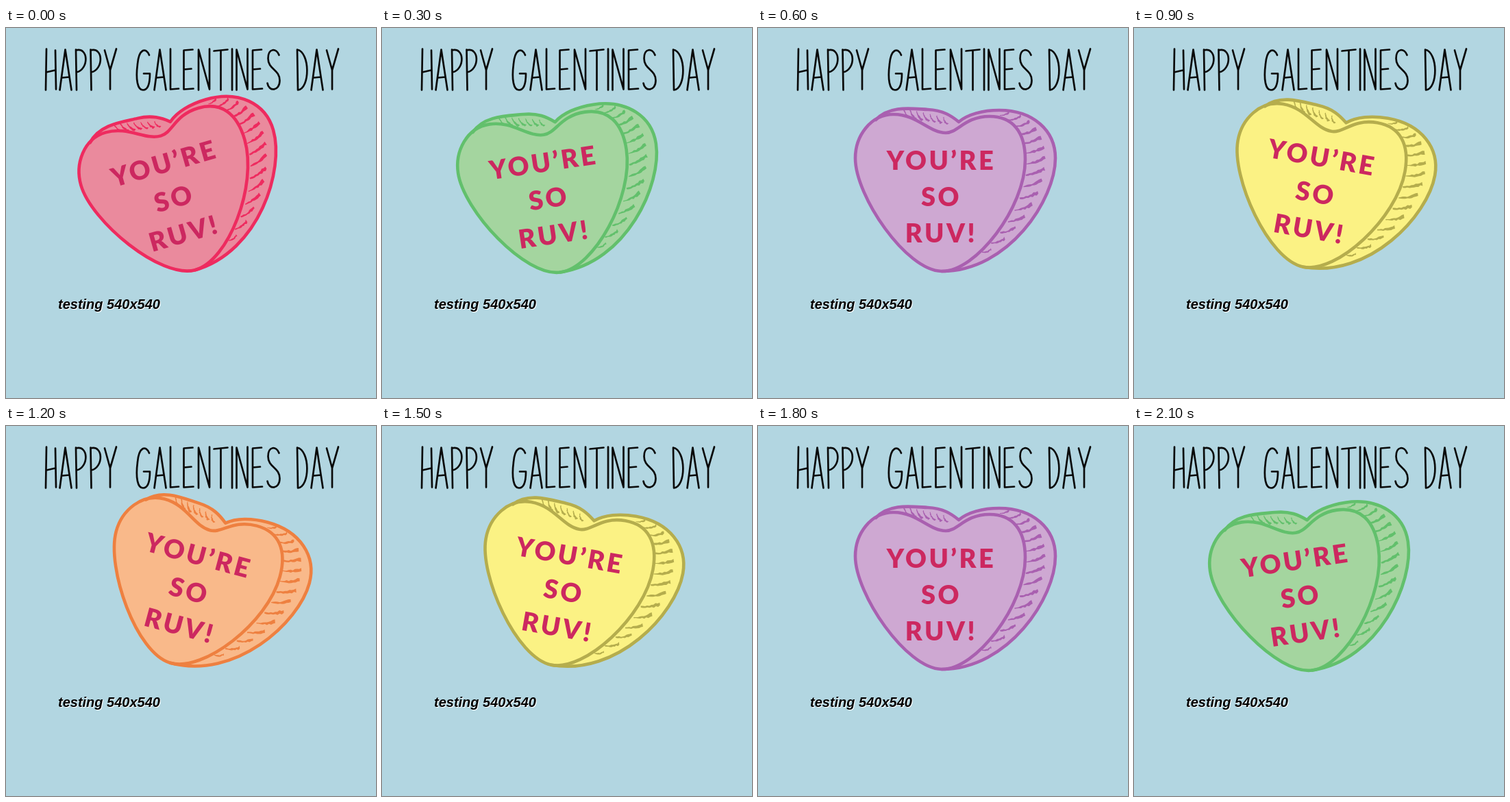
Write an HTML page with a canvas that moves like this. It is 540x540 px and loops after 2.4 s.

```html
<!DOCTYPE html>
<html lang="en">
<head>
<meta charset="utf-8">
<title>Candy heart</title>
<style>
  html, body { margin: 0; width: 100%; height: 100%; overflow: hidden; background: #b2d6e1; }
  canvas { display: block; }
</style>
</head>
<body>
<canvas id="stage" width="540" height="540" role="img" aria-label="Happy Galentines Day"></canvas>
<script>
const ctx = document.getElementById('stage').getContext('2d');
const STEP = 300;

// Hand lettering: width and strokes of each letter, 60 high
const GLYPHS = {
  H: [16, 'M2 0L1 60M15 2L16 59M2 34L15 31'],
  A: [17, 'M0 60L8 1L17 60M4 42L14 41'],
  P: [16, 'M1 1L2 60M1 2C20 -3 20 30 2 34'],
  Y: [17, 'M0 2L8 31M17 0L8 31L8 59'],
  G: [21, 'M19 9C14 -3 4 0 2 22C-1 45 2 60 10 60C18 60 20 48 20 36L11 36'],
  L: [14, 'M1 0L1 59L13 58'],
  E: [16, 'M14 1L1 2L1 59L15 58M1 30L12 29'],
  N: [18, 'M1 60L1 1L17 59L17 0'],
  T: [20, 'M0 3L20 1M10 2L10 60'],
  I: [1, 'M1 0L1 60'],
  S: [19, 'M18 9C14 -2 2 -1 2 14C2 30 19 30 19 46C19 62 3 63 1 50'],
  D: [16, 'M1 1L2 60C20 58 20 5 1 1']
};
const GAP = 5.5;

// Upright heart, centred on CX, CY
const CX = 266, CY = 246;
const face = new Path2D('M274 153C292 153 302 129 338 129C372 129 390 152 390 192' +
  'C390 262 318 356 268 355C216 354 142 245 142 190C142 158 164 126 198 126C232 126 250 153 274 153Z');
const back = new Path2D('M172 134C192 112 226 118 248 119C270 120 282 128 293 137' +
  'C306 126 328 120 352 120C402 120 434 150 434 190C434 250 366 355 268 355');

const PINK   = { fill: '#ea8a9d', line: '#ee2b5f', x: 244, y: 249, turn: -16 };
const GREEN  = { fill: '#a4d59f', line: '#62c06c', x: 242, y: 249, turn: -8.5 };
const PURPLE = { fill: '#cea8d2', line: '#a960b0', x: 266, y: 246, turn: 0 };
const YELLOW = { fill: '#fbf284', line: '#b5ad4d', x: 264, y: 241, turn: 10 };
const ORANGE = { fill: '#f9b98a', line: '#ee8040', x: 266, y: 240, turn: 15 };
const SWING = [PINK, GREEN, PURPLE, YELLOW, ORANGE, YELLOW, PURPLE, GREEN];

function seeded(seed) {
  return () => (seed = (seed * 16807) % 2147483647) / 2147483647;
}

const cubic = (t, a, b, c, d) =>
  a * (1 - t) ** 3 + 3 * b * t * (1 - t) ** 2 + 3 * c * t * t * (1 - t) + d * t ** 3;

// Ragged dry-brush stroke, thinner at the start
function brush(path, x, y, len, angle, wide, rnd) {
  const cos = Math.cos(angle), sin = Math.sin(angle), n = 9;
  const put = (t, side) => {
    const u = (t - .5) * len;
    const v = 6 * t * (1 - t) - 1 + side * wide * (.2 + .3 * t) * (.4 + rnd());
    path.lineTo(x + u * cos - v * sin, y + u * sin + v * cos);
  };
  path.moveTo(x - len / 2 * cos, y - len / 2 * sin);
  for (let i = 0; i <= n; i++) put(i / n, -1);
  for (let i = n; i >= 0; i--) put(i / n, 1);
  path.closePath();
}

function buildMarks() {
  const path = new Path2D(), rnd = seeded(77), count = 15;
  for (let i = 0; i < count; i++) {
    const t = i / (count - 1);
    const x = cubic(t, 360, 432, 416, 334), y = cubic(t, 126, 150, 262, 326);
    const bulge = Math.sqrt(Math.sin(Math.PI * t));
    brush(path, x, y, 14 + 15 * bulge, -.33, 3 + 2.5 * bulge, rnd);
  }
  for (let i = 0; i < 7; i++) {
    brush(path, 216 + i * 9.5, 125 + i * 1.8, 18 - i, 1, 3.4, rnd);
  }
  return path;
}

function addWord(path, word, x) {
  for (const c of word) {
    const [width, strokes] = GLYPHS[c];
    path.addPath(new Path2D(strokes), new DOMMatrix([1, 0, 0, 1, x, 30.5]));
    x += width + GAP;
  }
}

const marks = buildMarks();
const title = new Path2D();
addWord(title, 'HAPPY', 57);
addWord(title, 'GALENTINES', 190);
addWord(title, 'DAY', 424);

function drawHeart({ fill, line }) {
  ctx.save();
  ctx.translate(-CX, -CY);
  ctx.fillStyle = fill;
  ctx.fill(back);
  ctx.fillStyle = line;
  ctx.fill(marks);
  ctx.fillStyle = fill;
  ctx.fill(face);
  ctx.strokeStyle = line;
  ctx.lineWidth = 4.6;
  ctx.stroke(back);
  ctx.stroke(face);
  ctx.restore();
}

function drawMessage() {
  ctx.font = '900 38px Lato, "Open Sans", sans-serif';
  ctx.letterSpacing = '3.5px';
  ctx.textAlign = 'center';
  ctx.fillStyle = '#cc2860';
  ['YOU’RE', 'SO', 'RUV!'].forEach((word, i) => ctx.fillText(word, 1.5, 13.5 + (i - 1) * 53));
}

function drawCaption() {
  ctx.font = 'italic bold 20px "Liberation Sans", Arial, sans-serif';
  ctx.fillStyle = '#fff';
  ctx.fillText('testing 540x540', 77, 411);
  ctx.fillStyle = '#000';
  ctx.fillText('testing 540x540', 76, 410);
}

function draw(time) {
  const pose = SWING[Math.floor(time / STEP) % SWING.length];
  ctx.fillStyle = '#b2d6e1';
  ctx.fillRect(0, 0, 540, 540);
  ctx.lineCap = ctx.lineJoin = 'round';

  ctx.save();
  ctx.translate(pose.x, pose.y);
  ctx.rotate(pose.turn * Math.PI / 180);
  drawHeart(pose);
  drawMessage();
  ctx.restore();

  ctx.strokeStyle = '#0a0a0a';
  ctx.lineWidth = 2.7;
  ctx.stroke(title);
  drawCaption();
}

const start = performance.now();
function tick() {
  draw(Math.max(0, performance.now() - start));
  requestAnimationFrame(tick);
}
tick();
</script>
</body>
</html>
```
